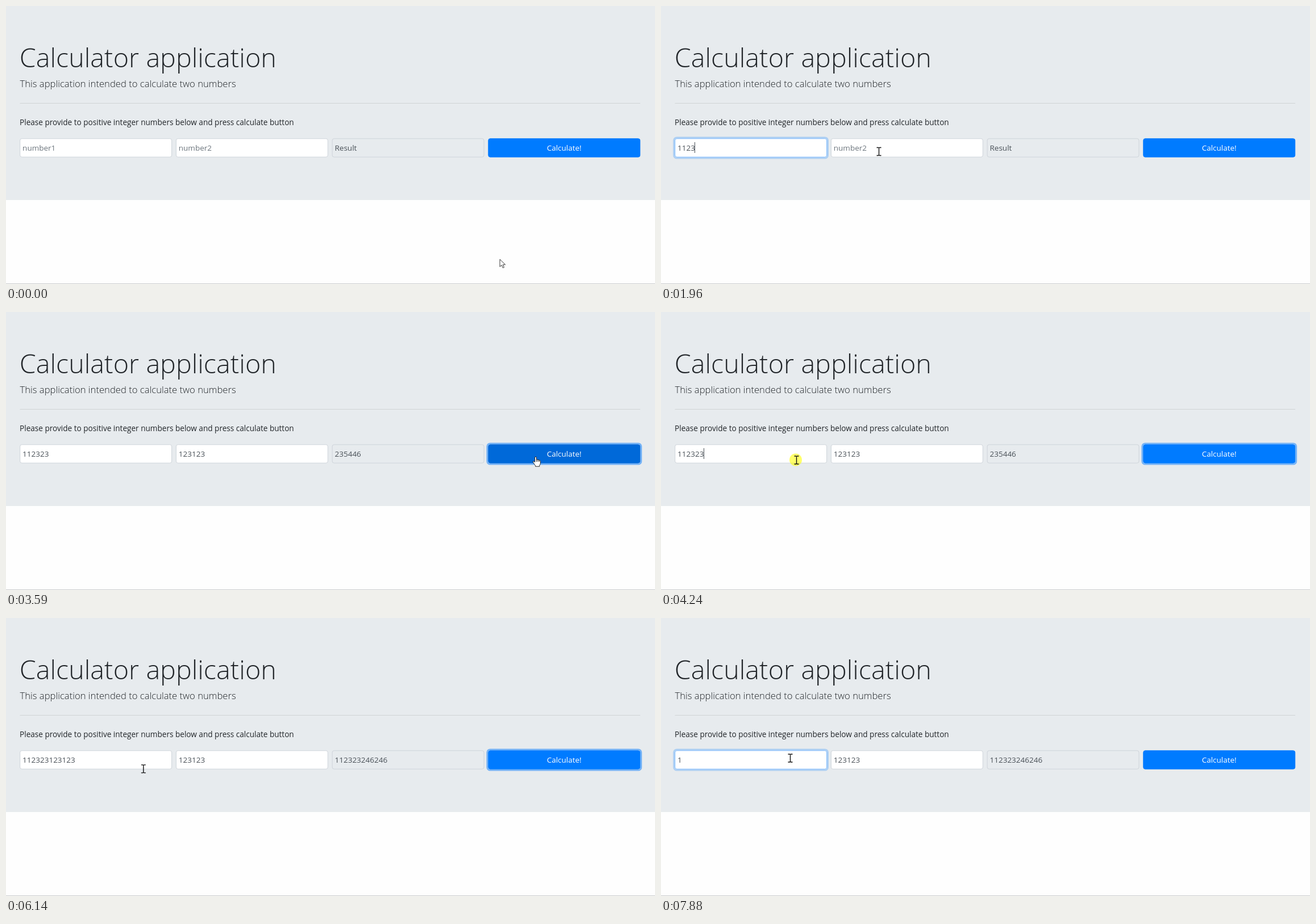
Animation of 1142x490 px, one loop 8000 ms. Source, as an HTML page:

```html
<!DOCTYPE html>
<html lang="en">
<head>
<meta charset="utf-8">
<title>Calculator application</title>
<style>
  html, body { margin: 0; width: 100%; height: 100%; overflow: hidden; background: #fefefe; }
  svg { display: block; width: 100%; height: 100%; }
  text { font: 13.5px "Open Sans", "Noto Sans", sans-serif; fill: #495057; white-space: pre; }
  .title { font-size: 46.7px; font-weight: 300; fill: #212529; }
  .lead { font-size: 16.64px; font-weight: 300; fill: #212529; }
  .copy { font-size: 13.59px; fill: #212529; }
  .ring { fill: none; stroke: #007bff; stroke-width: 2.9; }
</style>
</head>
<body>
<svg id="stage" viewBox="0 0 1142 490">
  <rect width="1142" height="342" fill="#e7ebee"/>
  <rect y="489" width="1142" height="1" fill="#c9cbcd"/>
  <text class="title" x="23.8" y="107.5">Calculator application</text>
  <text class="lead" x="24.5" y="142.6">This application intended to calculate two numbers</text>
  <rect x="24.5" y="171" width="1091.5" height="1" fill="#d0d4d6"/>
  <text class="copy" x="24.1" y="210">Please provide to positive integer numbers below and press calculate button</text>
</svg>
<script>
const NS = 'http://www.w3.org/2000/svg';
const LOOP = 8000;
const stage = document.getElementById('stage');

function add(tag, attrs, parent = stage) {
  const el = document.createElementNS(NS, tag);
  set(el, attrs);
  return parent.appendChild(el);
}
function set(el, attrs) {
  for (const k in attrs) el.setAttribute(k, attrs[k]);
}
function show(el, on) {
  el.setAttribute('visibility', on ? 'visible' : 'hidden');
}

const BOX = { x: 24.2, y: 233.3, w: 267.9, h: 33.4, pitch: 274.7 };
const DIGIT = 13.5 * 0.571;
const PAD = 4.9;

function makeBox(column, fill, stroke) {
  const x = BOX.x + column * BOX.pitch;
  const rect = add('rect', { x: x + .5, y: BOX.y + .5, width: BOX.w - 1, height: BOX.h - 1, rx: 3.2, fill, stroke });
  const ring = add('rect', { class: 'ring', x: x - 1.45, y: BOX.y - 1.45, width: BOX.w + 2.9, height: BOX.h + 2.9, rx: 5 });
  return { x, rect, ring };
}
function makeInput(column, fill, hint) {
  const box = makeBox(column, fill, '#ced4da');
  box.hint = hint;
  box.mark = add('rect', { x: box.x + PAD, y: 240, height: 20, fill: '#3390ff' });
  box.label = add('text', { x: box.x + PAD, y: 255.3 });
  box.caret = add('rect', { y: 240, width: 1, height: 19, fill: '#495057' });
  show(box.mark, false);
  show(box.caret, false);
  return box;
}

const first = makeInput(0, '#fff', 'number1');
const second = makeInput(1, '#fff', 'number2');
const result = makeInput(2, '#e7ebee', '');
const button = makeBox(3, '#007bff', '#007bff');
add('text', { x: 982.2, y: 255.3, 'text-anchor': 'middle', style: 'fill:#fff' }).textContent = 'Calculate!';
set(result.ring, { 'stroke-opacity': 0 });

const halo = add('circle', { r: 11, fill: '#ffff00', opacity: .58 });
const pointer = add('g', {});
const shapes = {
  arrow: add('path', { d: 'M.5 .5V13.6L3.6 10.7L5.8 15.6L8 14.6L5.8 9.9H10.1Z', fill: '#fff', stroke: '#222', 'stroke-width': .9 }, pointer),
  beam: add('path', { d: 'M-4 -7H-1.2L0 -6.3L1.2 -7H4M0 -6.3V6.3M-4 7H-1.2L0 6.3L1.2 7H4', fill: 'none', stroke: '#111', 'stroke-width': 1.4 }, pointer),
  hand: add('path', {
    d: 'M-1.4 .9Q0 -.7 1.4 .9V5.4Q2.8 4.4 3.9 5.8Q5.3 5 6.3 6.4Q8 6 8.4 7.6V11.4Q8.2 13.8 6.8 15.2V17.2H-.4V15.8Q-2.4 13.6 -3.2 11.6L-4.8 9.4Q-4.8 7.6 -3 8.2L-1.4 9.8ZM1.4 5.4V9M3.9 5.8V9M6.3 6.4V9',
    fill: '#fff', stroke: '#111', 'stroke-width': .9, 'stroke-linejoin': 'round'
  }, pointer)
};

// Pointer path: time, x, y
const path = [
  [0, 868.5, 446], [40, 868.5, 446], [250, 600, 330], [400, 300, 226], [560, 196, 258],
  [690, 194, 261], [1650, 194, 261], [1960, 383.5, 256.5], [2450, 383.5, 256.5],
  [2710, 665, 290], [2800, 665, 290], [3050, 928.5, 248.5], [3190, 932, 255], [3600, 932, 255],
  [3880, 520, 267.5], [4110, 238.5, 261], [4700, 238.5, 261], [5060, 945.5, 261.5],
  [5500, 945.5, 261.5], [5810, 282, 287], [5960, 282, 287], [6140, 242, 266],
  [6340, 227.5, 247], [LOOP, 227.5, 247]
];
const clicks = [690, 2180, 3390, 4235, 5340, 6360];
const focus = {
  first: [[690, 2180], [4235, 5340], [6360, LOOP + 500]],
  second: [[2180, 3390]],
  button: [[3390, 4235], [5340, 6360]]
};
const hover = [[3030, 3640], [4950, 5545]];
const keys = {
  first: [1170, 1380, 1570, 1780, 2030, 2100, 4650, 4720, 4790, 4860, 4930, 5000],
  second: [2450, 2560, 2660, 2840, 2960, 3120]
};
const SELECT = 7020, REPLACE = 7350, BLINK = 530;

const smooth = p => p * p * (3 - 2 * p);
const ramp = (t, start) => smooth(Math.min(1, Math.max(0, (t - start) / 150)));
const level = (t, spans) => spans.reduce((v, [a, b]) => v + ramp(t, a) - ramp(t, b), 0);
const within = (t, spans) => spans.some(([a, b]) => t >= a && t < b);
const mix = (a, b, p) => `rgb(${a.map((v, i) => Math.round(v + (b[i] - v) * p))})`;
const latest = (t, times) => Math.max(-LOOP, ...times.filter(v => v <= t));

// Slope at a path point, zero next to a rest
function slope(i, k) {
  const a = path[i - 1], b = path[i], c = path[i + 1];
  if (!a || !c || (b[k] - a[k]) * (c[k] - b[k]) <= 0) return 0;
  return (c[k] - a[k]) / (c[0] - a[0]);
}
function pointerAt(t) {
  let i = 0;
  while (i < path.length - 2 && path[i + 1][0] <= t) i++;
  const a = path[i], b = path[i + 1], d = b[0] - a[0], p = (t - a[0]) / d;
  return [1, 2].map(k =>
    a[k] + (b[k] - a[k]) * smooth(p) +
    d * p * (1 - p) * (slope(i, k) * (1 - p) - slope(i + 1, k) * p));
}
const over = (box, x, y) => x >= box.x && x <= box.x + BOX.w && y >= BOX.y && y <= BOX.y + BOX.h;

function drawInput(box, t, value, spans, times) {
  box.label.textContent = value || box.hint;
  box.label.style.fill = value ? '#495057' : '#6c757d';
  const f = level(t, spans);
  set(box.ring, { 'stroke-opacity': .25 * f });
  set(box.rect, { stroke: mix([206, 212, 218], [128, 189, 255], f) });
  const idle = t - latest(t, [...clicks, ...times]);
  set(box.caret, { x: Math.floor(box.x + PAD + value.length * DIGIT) });
  show(box.caret, within(t, spans) && idle % (2 * BLINK) < BLINK);
}

function draw(t) {
  const typed = (text, times) => text.slice(0, times.filter(v => v <= t).length);
  const value = t >= REPLACE ? '1' : typed('112323123123', keys.first);
  drawInput(first, t, value, focus.first, [...keys.first, REPLACE]);
  drawInput(second, t, typed('123123', keys.second), focus.second, keys.second);

  const selected = t >= SELECT && t < REPLACE;
  show(first.mark, selected);
  set(first.mark, { width: 12 * DIGIT });
  if (selected) {
    first.label.style.fill = '#fff';
    show(first.caret, false);
  }

  result.label.textContent = t >= 5470 ? '112323246246' : t >= 3460 ? '235446' : 'Result';

  const color = mix([0, 123, 255], [0, 105, 217], level(t, hover));
  set(button.rect, { fill: color, stroke: color });
  set(button.ring, { 'stroke-opacity': .5 * level(t, focus.button) });

  const [x, y] = pointerAt(t);
  const kind = over(button, x, y) ? 'hand' : over(first, x, y) || over(second, x, y) ? 'beam' : 'arrow';
  for (const k in shapes) show(shapes[k], k === kind);
  set(pointer, { transform: `translate(${x.toFixed(2)} ${y.toFixed(2)})` });
  set(halo, { cx: x - 1.5, cy: y - .5 });
  show(halo, t - latest(t, clicks) < 200);
}

const start = performance.now();
function tick() {
  draw((performance.now() - start) % LOOP);
  requestAnimationFrame(tick);
}
tick();
</script>
</body>
</html>
```
